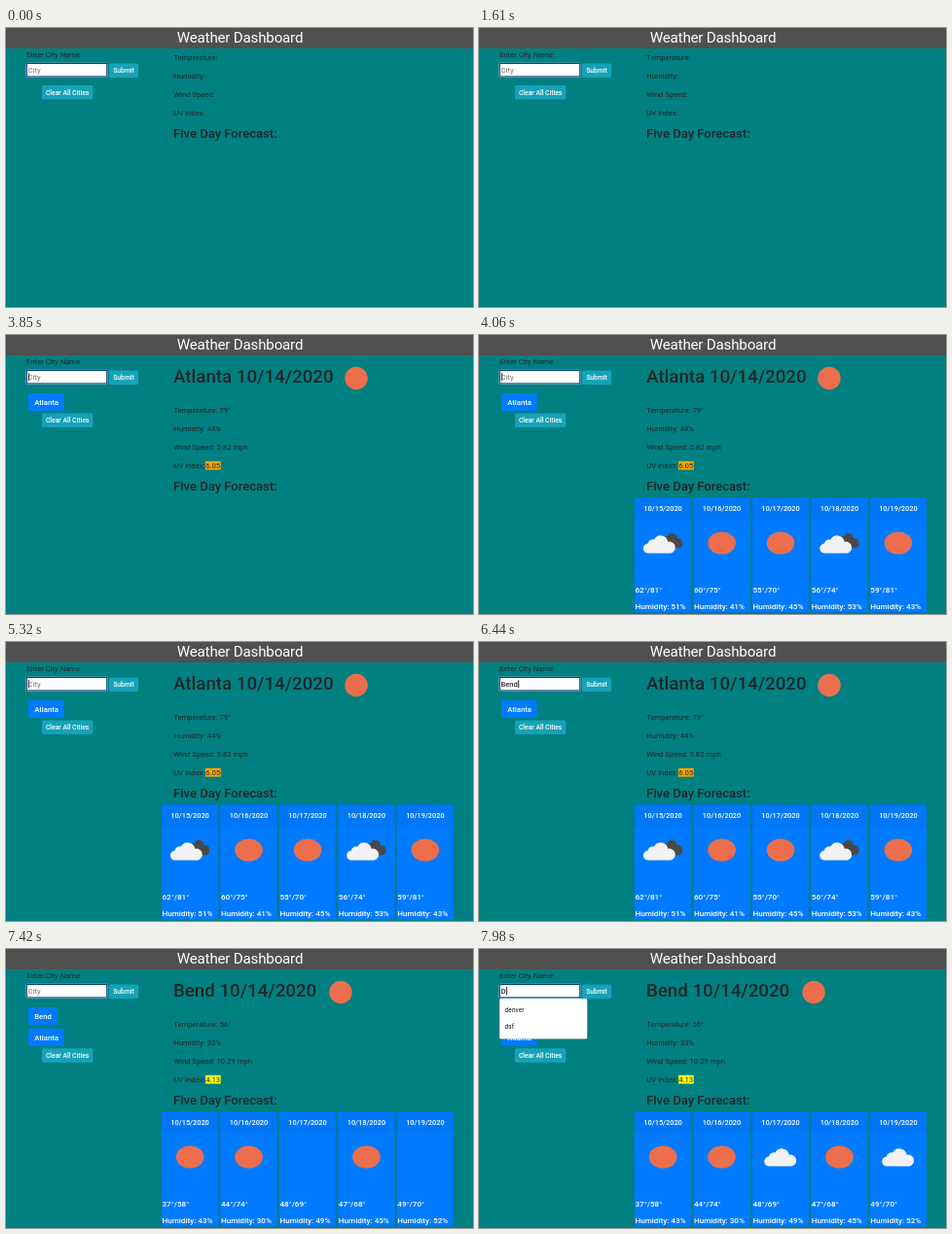
Animation of 480x287 px, one loop 8000 ms. Source, as an HTML page:

```html
<!DOCTYPE html>
<html lang="en">
<head>
<meta charset="utf-8">
<title>Weather Dashboard</title>
<style>
  html, body { margin: 0; width: 100%; height: 100%; overflow: hidden; background: #008080; }
  svg { display: block; width: 480px; height: 287px; }
  text { font: 7.7px Roboto, Inter, sans-serif; fill: #212529; white-space: pre; }
  .title { font-size: 15.1px; letter-spacing: -.18px; fill: #fff; text-anchor: middle; }
  .city { font-size: 18.7px; font-weight: 500; }
  .forecast { font-size: 13.05px; font-weight: 500; }
  .light { fill: #fff; font-weight: 500; }
  .mid { text-anchor: middle; }
  .small { font-size: 6.75px; }
  .hint { fill: #757575; }
  .option { font-size: 6.5px; letter-spacing: .1px; fill: #111; }
  .date { font-size: 7.4px; }
  .day { font-size: 8.1px; }
</style>
</head>
<body>
<svg viewBox="0 0 480 287">
  <defs>
    <path id="cloud" d="M-11.5 9.5a5 5 0 0 1-.6-10a5.4 5.4 0 0 1 6.6-4.2a7.6 7.6 0 0 1 14.2 2.4a6 6 0 0 1 2.8 11.8z"/>
    <ellipse id="sun" rx="14.3" ry="11.6" fill="#ec6e4c"/>
    <g id="clear"><use href="#sun"/></g>
    <g id="cloudy"><use href="#cloud" fill="#f2f2f2"/></g>
    <g id="broken">
      <use href="#cloud" fill="#484848" transform="translate(8.4 -2.8) scale(.73 .85)"/>
      <use href="#cloud" fill="#f2f2f2" transform="translate(-3.5 1)"/>
    </g>
  </defs>
  <rect width="480" height="287" fill="#008080"/>
  <rect width="480" height="21" fill="#505050"/>
  <text class="title" x="240.5" y="15">Weather Dashboard</text>
  <text x="21" y="29.7">Enter City Name</text>
  <g id="view"></g>
  <rect id="caret" y="39" width=".8" height="8.4" fill="#000"/>
</svg>
<script>
const LOOP = 8000, STEP = 70, BLINK = 515;
const BLUE = '#007bff', INFO = '#17a2b8';

const weather = {
  Atlanta: {
    temp: 79, humid: 44, wind: '5.82', uv: '6.05', tint: '#ffa500', sunX: 360,
    days: [[62, 81, 51, 'broken'], [60, 75, 41, 'clear'], [55, 70, 45, 'clear'],
           [56, 74, 53, 'broken'], [59, 81, 43, 'clear']]
  },
  Bend: {
    temp: 56, humid: 33, wind: '10.29', uv: '4.13', tint: '#ff0', sunX: 344,
    days: [[37, 58, 43, 'clear'], [44, 74, 30, 'clear'], [48, 69, 49, 'cloudy'],
           [47, 68, 45, 'clear'], [49, 70, 52, 'cloudy']]
  }
};

// Each entry holds from its time until the next one.
const typing = [[20 - 2 * BLINK, ''], ...keys('Atlanta', [2030, 2520, 2660, 2800, 2870, 3010, 3290]),
  [3780, ''], ...keys('Bend', [5950, 6090, 6230, 6370]), [6860, ''], [7700, 'D']];
const history = [[0, []], [3780, ['Atlanta']], [6860, ['Bend', 'Atlanta']]];
const current = [[0, ''], [3850, 'Atlanta'], [6930, 'Bend']];
const outlook = [[0, ''], [4060, 'Atlanta'], [7070, 'Bend']];
const options = [[0, []], [2100, ['Atlanta']], [3290, []], [7770, ['denver', 'dsf']]];
const CLOUDS_READY = 7490;

function keys(word, times) {
  return times.map((time, i) => [time, word.slice(0, i + 1)]);
}
const at = (track, t) => track.filter(([time]) => time <= t).pop();
const text = (x, y, str, cls = '') => `<text x="${x}" y="${y}" class="${cls}">${str}</text>`;
const rect = (x, y, w, h, fill, extra = '') =>
  `<rect x="${x}" y="${y}" width="${w}" height="${h}" fill="${fill}" ${extra}/>`;
const use = (id, x, y, scale = '') =>
  `<use href="#${id}" transform="translate(${x} ${y}) ${scale}"/>`;

function drawForm(value, cities) {
  let out = rect(20.5, 35.7, 84, 15, '#fff', 'rx="1.2" opacity=".8"')
    + rect(21.3, 36.5, 82.4, 13.4, '#fff', 'stroke="#0b4384" stroke-width="1.1"')
    + (value ? '<text id="typed" x="22.5" y="46" style="fill:#000">' + value + '</text>'
             : text(22.5, 46, 'City', 'hint'))
    + rect(106, 36.5, 30, 14.5, INFO, 'rx="1.5"')
    + text(121, 46.3, 'Submit', 'light mid small');
  cities.forEach((name, i) => {
    const y = 60 + 21.8 * i;
    out += rect(23, y, name === 'Bend' ? 30 : 36.6, 18, BLUE, 'rx="2"')
      + text(29.2, y + 12, name, 'light');
  });
  const y = 59 + 21.6 * cities.length;
  return out + rect(37, y, 52.3, 14.5, INFO, 'rx="1.5"')
    + text(63.1, y + 9.6, 'Clear All Cities', 'light mid small');
}

function drawCurrent(name) {
  const w = weather[name];
  const top = w ? 80 : 33;
  const lines = ['Temperature: ' + (w ? w.temp + '°' : ''), 'Humidity: ' + (w ? w.humid + '%' : ''),
    'Wind Speed: ' + (w ? w.wind + ' mph' : ''), 'UV Index:'];
  let out = lines.map((line, i) => text(172.2, top + 19 * i, line)).join('');
  out += text(172, top + 79.7, 'Five Day Forecast:', 'forecast');
  if (w) {
    out += text(172, 49.3, name + ' 10/14/2020', 'city')
      + use('sun', w.sunX, 44.5, 'scale(.82 1.01)')
      + rect(205, 129.8, 15.7, 8.8, w.tint) + text(205.2, 137, w.uv);
  }
  return out;
}

function drawCards(name, cloudsReady) {
  if (!name) return '';
  return weather[name].days.map(([low, high, humid, icon], i) => {
    const x = 159.7 + 60.45 * i, mid = x + 29.4;
    return rect(x, 167, 58.7, 118.6, BLUE, 'rx="1.9"')
      + rect(x + .25, 167.25, 58.2, 118.1, 'none', 'rx="1.7" stroke="#000" stroke-width=".5" opacity=".125"')
      + rect(x, 167, 58.7, 22.5, '#000', 'rx="1.9" opacity=".03"')
      + text(mid, 181.3, `10/${15 + i}/2020`, 'light mid date')
      + (icon !== 'cloudy' || cloudsReady ? use(icon, mid, 214) : '')
      + text(x + .8, 264.8, `${low}°/${high}°`, 'light day')
      + text(x + .8, 282.2, `Humidity: ${humid}%`, 'light day');
  }).join('');
}

function drawOptions(list) {
  if (!list.length) return '';
  const h = 7 + 17.2 * list.length;
  return rect(20.5, 51.2, 91.2, h + .4, '#000', 'rx="2" opacity=".25"')
    + rect(21, 51, 90.3, h, '#fff', 'rx="1.5"')
    + list.map((name, i) => text(26.6, 65.3 + 17 * i, name, 'option')).join('');
}

const view = document.getElementById('view');
const caret = document.getElementById('caret');
let shown = '';

function render(time) {
  const t = Math.floor(time % LOOP / STEP) * STEP;
  const [since, value] = at(typing, t);
  const markup = drawForm(value, at(history, t)[1]) + drawCurrent(at(current, t)[1])
    + drawCards(at(outlook, t)[1], t >= CLOUDS_READY) + drawOptions(at(options, t)[1]);
  if (markup !== shown) view.innerHTML = shown = markup;
  const typed = document.getElementById('typed');
  caret.setAttribute('x', 22.9 + (typed ? typed.getComputedTextLength() : 0));
  caret.style.visibility = Math.floor((t - since) / BLINK) % 2 ? 'hidden' : 'visible';
}

let start;
function tick(now) {
  start ??= now;
  render(now - start);
  requestAnimationFrame(tick);
}
render(0);
requestAnimationFrame(tick);
</script>
</body>
</html>
```
